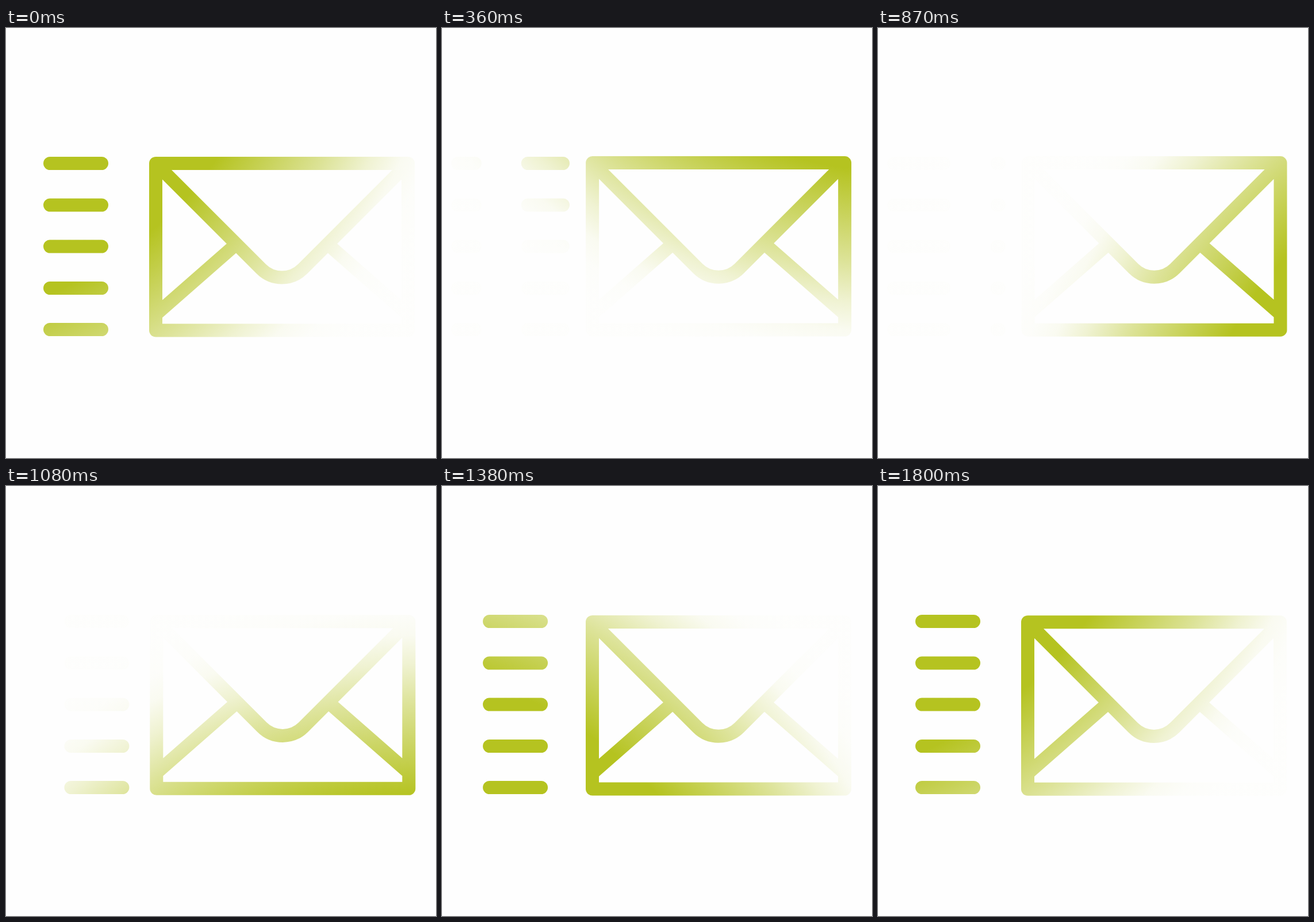
These frames come from a looping animation (748x748 px, 1830 ms). An HTML page:

```html
<!DOCTYPE html>
<html lang="en">
<head>
<meta charset="utf-8">
<title>Mail on its way</title>
<style>
  html, body { margin: 0; height: 100%; overflow: hidden; background: #fefefe; }
  svg { display: block; width: 100%; height: 100%; }
</style>
</head>
<body>
<svg viewBox="0 0 748 748" fill="none" stroke="url(#glow)" stroke-width="23" stroke-linecap="round" stroke-linejoin="round">
  <radialGradient id="glow" gradientUnits="userSpaceOnUse" r="1060"></radialGradient>
  <path id="dashes" stroke-dasharray="90 92"
    d="M27.5 235.5H210.5M27.5 308H210.5M27.5 380H210.5M27.5 452.5H210.5M27.5 524.5H210.5"/>
  <path id="envelope"
    d="M262.5 234.2H701.5V524.8H262.5Z
       M262.5 234.5L446 418A51 51 0 0 0 518 418L701.5 234.5
       M262.5 497.5L400 377M701.5 497.5L564 377"/>
</svg>
<script>
const LOOP = 1830, STEP = 30, TURN = 1800;
const PERIOD = 182, PERIODS = 13;
const glow = document.getElementById('glow');
const dashes = document.getElementById('dashes');
const envelope = document.getElementById('envelope');

// radius, strength
const falloff = [[690, 1], [770, .73], [850, .46], [920, .2], [970, .06], [1010, .02], [1060, .008]];
glow.innerHTML = falloff.map(([r, a]) =>
  `<stop offset="${r / 1060}" stop-color="#b5c320" stop-opacity="${a}"/>`).join('');

// slight drift of the envelope: time, x, y
const drift = [[0, -2, 1.2], [180, 0, 0], [570, -2, .7], [870, -1.5, .4],
  [1080, -.7, 1.5], [1380, -1, 2.3], [1800, -2, 2.5]];

function driftAt(t) {
  const i = Math.max(1, drift.findIndex(k => k[0] >= t));
  const [a, b] = [drift[i - 1], drift[i]];
  const u = (t - a[0]) / (b[0] - a[0]);
  const s = u * u * (3 - 2 * u);
  return [1, 2].map(n => a[n] + (b[n] - a[n]) * s);
}

function draw(now) {
  const t = Math.floor(now % LOOP / STEP) * STEP;
  const turn = t / TURN;

  // the light circles far outside the stage
  const angle = (219 + 360 * turn) * Math.PI / 180;
  const x = 488 + 878 * Math.cos(angle), y = 380 + 878 * Math.sin(angle);
  for (const [name, value] of [['cx', x], ['fx', x], ['cy', y], ['fy', y]])
    glow.setAttribute(name, value);

  dashes.setAttribute('stroke-dashoffset', (PERIOD * PERIODS * turn - 49) % PERIOD);
  envelope.setAttribute('transform', `translate(${driftAt(t)})`);
}

const start = performance.now();
function tick() {
  draw(performance.now() - start);
  requestAnimationFrame(tick);
}
tick();
</script>
</body>
</html>
```
